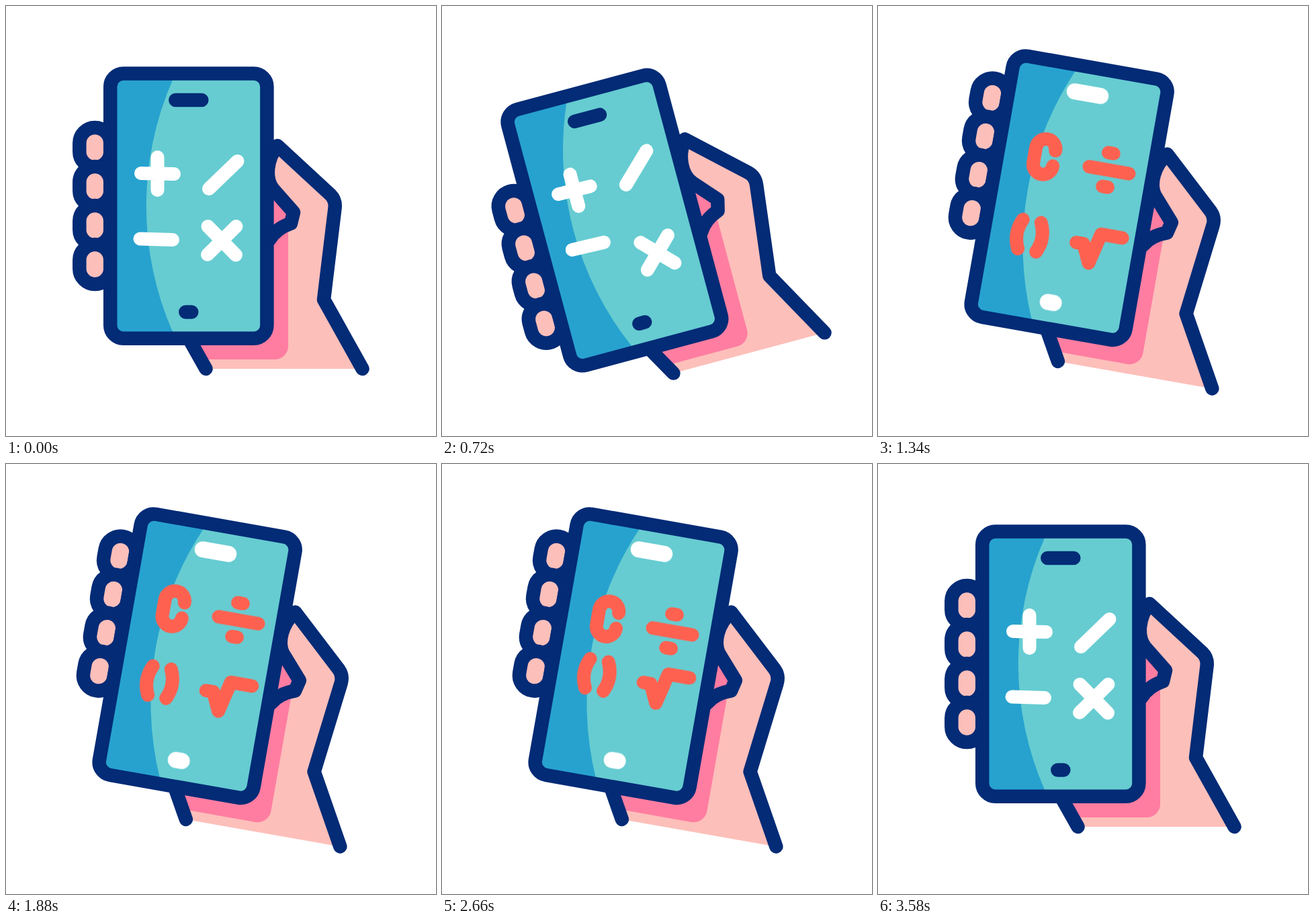
Write an HTML page that moves like this. It is 640x640 px and loops after 3.6 s.

```html
<!DOCTYPE html>
<html lang="en">
<head>
<meta charset="utf-8">
<title>Shake to calculate</title>
<style>
  html, body { margin: 0; width: 100%; height: 100%; overflow: hidden; background: #fff; }
  svg { display: block; width: 100vw; height: 100vh; }
  path, .line { stroke-linecap: round; stroke-linejoin: round; }
  .line { fill: none; stroke: #032b76; stroke-width: 20.5; }
  .sign { fill: none; stroke-width: 20; }
</style>
</head>
<body>
<svg viewBox="0 0 640 640">
  <g id="scene">
    <g id="fingers"></g>

    <!-- palm, shade, wrist and thumb -->
    <path fill="#fdbfba" d="M404 208 L483 281 Q491 289 489.500 301 L473 437 L530.500 540 H297.500 L262 477 L380 400 L424 324 L428 307 L398 273 C385 257 388 228 404 208Z"/>
    <path fill="#ff7da1" d="M385 280 L398 275 L428 307 L420 326 V506 A20 20 0 0 1 400 526 H290 L270 490 L385 470Z"/>
    <path class="line" d="M262 477 L297.500 540"/>
    <path class="line" d="M392 348 Q402 331 424 323.500 L428 307 L398 273 C385 257 388 228 404 208 L483 281 Q491 289 489.500 301 L473 437 L530.500 540"/>

    <!-- phone -->
    <rect x="155" y="100" width="234" height="395" rx="19.500" fill="#66ccd1"/>
    <path fill="#27a2ce" d="M160 105 H250 L248 110 A468 468 0 0 0 248 485 L250 490 H160Z"/>
    <rect class="line" x="155.200" y="100.500" width="233.200" height="394.200" rx="19.500"/>
    <path class="line" d="M252.300 140 h39 M267.300 455.500 h9"/>

    <g id="basic" stroke="#fff"></g>
    <g id="extra" stroke="#ff6150">
      <path class="sign" stroke="#fff" style="stroke-width:24" d="M252.300 140 h39 M267.300 455.500 h9"/>
    </g>
  </g>
</svg>
<script>
const LOOP = 3600;
const NS = 'http://www.w3.org/2000/svg';
const $ = id => document.getElementById(id);

function add(parent, tag, attrs) {
  const el = document.createElementNS(NS, tag);
  for (const k in attrs) el.setAttribute(k, attrs[k]);
  return parent.appendChild(el);
}

for (let i = 0; i < 4; i++) {
  add($('fingers'), 'rect', {
    x: 109.3, y: 181 + 58 * i, width: 46, height: 59, rx: 23,
    class: 'line', style: 'fill:#fdbfba'
  });
}

// Signs fill a 2 x 2 grid; each is drawn around its own cell centre and
// bobs along a sine: height, start, length of a half wave, number of half waves.
function makeSigns(id, list) {
  return list.map(([d, height, from, half, waves = 1], i) => ({
    el: add($(id), 'path', { class: 'sign', d }),
    x: 224 + 98 * (i % 2),
    y: 250 + 98 * (i >> 1),
    height, from, half, waves
  }));
}

const signs = [
  ...makeSigns('basic', [
    ['M-23 -1 l49 1 M1.5 -25 v49', -14, 0, 1000],
    ['M-20 22 l42.5 -41', -22, 0, 1240],
    ['M-24.5 -1.5 l48.5 1.5', -23, 190, 1100],
    ['M-21.5 -20 l41.5 42.5 m0.5 -42.5 l-42.5 42', 12, 360, 900]
  ]),
  ...makeSigns('extra', [
    ['M15.5 -11.5 a14.75 15 0 0 0 -29.5 0 v23 a14.75 15 0 0 0 29.5 0', -19, 1240, 920],
    ['M-29 1.5 h60 M-4.5 -24 h8 m0 51 h-8', -19, 1260, 960],
    ['M-14.5 -22.5 q-10.5 22 0 44 m27.5 -44 q10.5 22 0 44', 16, 680, 1160, 2],
    ['M-28.5 -2 h11 L-5 25 L6 -20.5 h32', 15, 760, 1120, 2]
  ])
];

// Each swing eases the hand to a new tilt and slides the fingers along the phone.
const swings = [
  { from: 0, to: 340, tilt: -15, slide: 34.5 },
  { from: 735, to: 1135, tilt: 10, slide: -39.5 },
  { from: 2800, to: 3230, tilt: -10, slide: 22.5 },
  { from: 3250, to: 3570, tilt: 0, slide: 0 }
];

function ramp(t, a, b) {
  const x = Math.min(1, Math.max(0, (t - a) / (b - a)));
  return 0.5 - 0.5 * Math.cos(Math.PI * x);
}

const follow = (key, t) =>
  swings.reduce((v, s) => v + (s[key] - v) * ramp(t, s.from, s.to), 0);

function bob(s, t) {
  const x = (t - s.from) / s.half;
  return x > 0 && x < s.waves ? s.height * Math.sin(Math.PI * x) : 0;
}

function draw(t) {
  $('scene').setAttribute('transform', `rotate(${follow('tilt', t)} 346 365)`);
  $('fingers').setAttribute('transform', `translate(0 ${follow('slide', t)})`);
  for (const s of signs) s.el.setAttribute('transform', `translate(${s.x} ${s.y + bob(s, t)})`);
  const mix = ramp(t, 1120, 1240) - ramp(t, 3320, 3460);
  $('basic').setAttribute('opacity', 1 - mix);
  $('extra').setAttribute('opacity', mix);
}

const start = performance.now();
function tick() {
  draw((performance.now() - start) % LOOP);
  requestAnimationFrame(tick);
}
tick();
</script>
</body>
</html>
```
